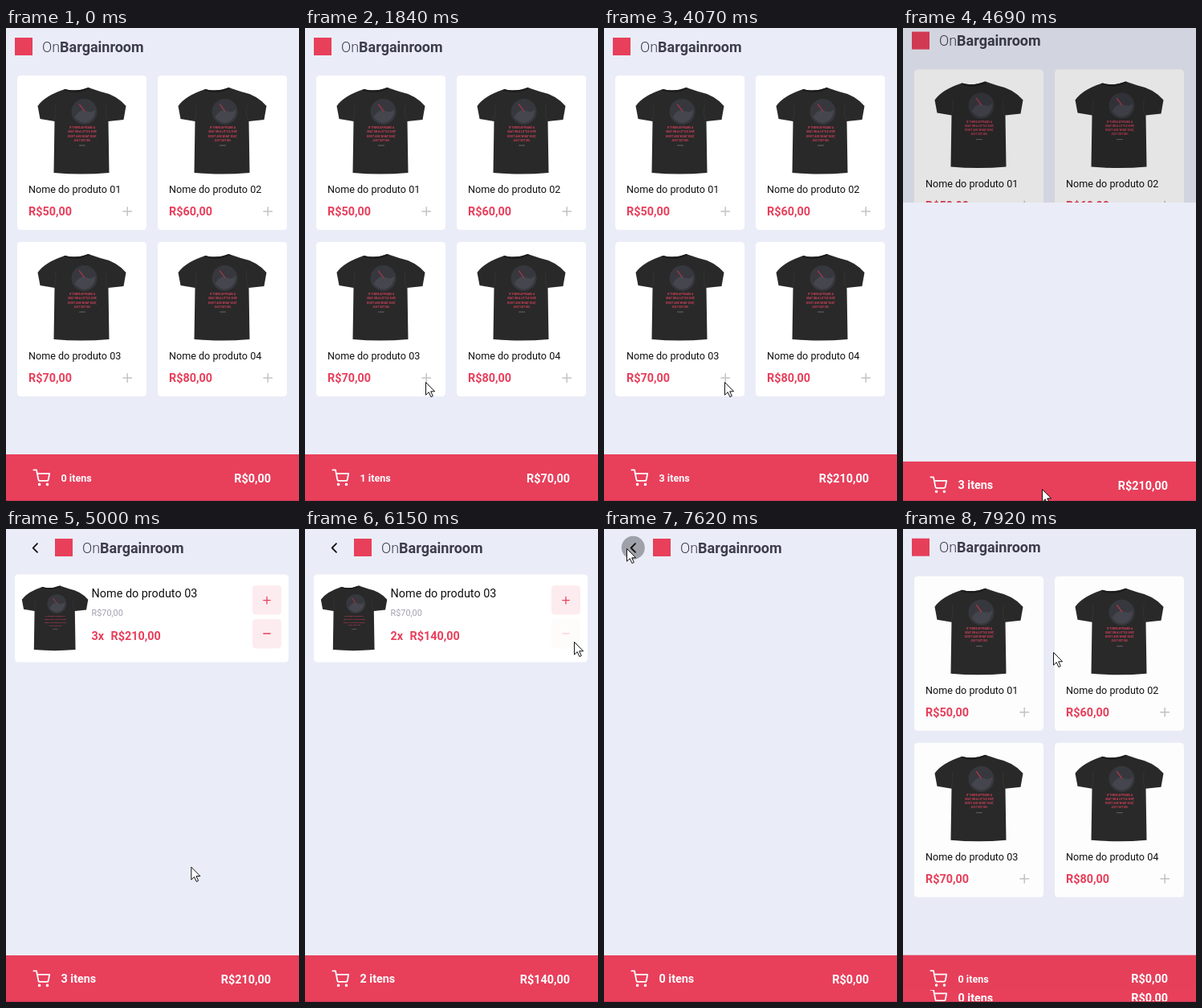
An HTML page that plays this animation: 365x588 px, repeating every 8000 ms.

```html
<!DOCTYPE html>
<html lang="pt">
<head>
<meta charset="utf-8">
<title>Loja</title>
<style>
  html, body { margin: 0; width: 100%; height: 100%; overflow: hidden; background: #eaedf8; }
  svg { display: block; width: 365px; height: 588px; font-family: Roboto, sans-serif; }
  .b { font-weight: 700; }
  .red { fill: #e83f5b; }
  .line { fill: none; stroke-linecap: round; stroke-linejoin: round; }
</style>
</head>
<body>
<svg id="stage" viewBox="0 0 365 588"></svg>
<script>
const RED = '#e83f5b', BG = '#eaedf8', PINK = '#fdecef', W = 365, H = 588, LOOP = 8000;

const text = (x, y, size, body, attrs = '') =>
  `<text x="${x}" y="${y}" font-size="${size}" ${attrs}>${body}</text>`;
const box = (x, y, w, h, fill, r = 0, attrs = '') =>
  `<rect x="${x}" y="${y}" width="${w}" height="${h}" rx="${r}" fill="${fill}" ${attrs}/>`;
const line = (d, color, width, attrs = '') =>
  `<path class="line" d="${d}" stroke="${color}" stroke-width="${width}" ${attrs}/>`;

const heading = x => box(x, 12, 22, 22, RED) +
  text(x + 34, 29.5, 18, '<tspan font-weight="300">On</tspan><tspan class="b">Bargainroom</tspan>', 'fill="#3d3d4d"');

const bar = (id, size) => box(0, 530, W, 90, RED) +
  `<g id="${id}Link">
    <g class="line" transform="translate(33.5 548.5) scale(.9)" stroke="#fff" stroke-width="2">
      <circle cx="9" cy="21" r="1"/><circle cx="20" cy="21" r="1"/>
      <path d="M1 1h4l2.68 13.39a2 2 0 0 0 2 1.61h9.72a2 2 0 0 0 2-1.61L23 6H6"/>
    </g>
    ${text(68.5, 550 + size, size, '', `id="${id}Count" class="b" fill="#fff"`)}
  </g>` +
  text(330, 564.7, 14.4, '', `id="${id}Total" class="b" fill="#fff" text-anchor="end"`);

const quote = ['IF THERE APPEARS A', 'SEAT ON A LITTLE SHIP,', 'DON’T ASK WHAT SEAT,', 'JUST GET ON.'];
const shirt = `<g id="shirt">
  <path fill="#292929" d="M34 3Q48 7 63 1L78 6Q98 10 110 24L107 41 88 43 89 107Q54 110 20 107L21 43 3 40 0 24Q9 11 34 3Z"/>
  <path fill="#1c1c1c" d="M34 3Q48 7 63 1L65 2Q48 11 32 4Z"/>
  ${line('M21 41Q24 31 22 23M87 42Q83 32 86 22', '#343434', 1)}
  <circle cx="58" cy="31" r="16" fill="#37383e"/>
  <path fill="#45464e" d="M46 38Q52 27 60 30T72 28Q71 43 58 45 51 44 46 38Z"/>
  ${line('M52 22L58 30', '#b9374c', 1.2)}
  ${quote.map((q, i) => text(55.5, 52.3 + i * 5.1, 3.3, q, 'class="b" text-anchor="middle" fill="#d0405a"')).join('')}
  ${line('M52 73h7', '#77777c', .8)}
</g>`;

const product = i => {
  const x = 14 + i % 2 * 175, y = 59 + (i >> 1) * 207;
  return box(x, y, 161, 192, '#fff', 4.5) +
    `<use href="#shirt" x="${x + 25.5}" y="${y + 14}"/>` +
    text(x + 14, y + 146.3, 12.6, `Nome do produto 0${i + 1}`, 'fill="#111"') +
    text(x + 14, y + 174, 14.4, `R$${50 + i * 10},00`, 'class="b red"') +
    line(`M${x + 131.9} ${y + 169}h10.6m-5.3 -5.3v10.6`, '#c4c4c4', 1.5, `id="plus${i}"`);
};

stage.innerHTML = `
  <defs>${shirt}<clipPath id="reveal">${box(0, 0, W, H, '#000', 0, 'id="window"')}</clipPath></defs>
  <g id="home">
    ${box(0, 0, W, 620, BG)}${heading(11)}
    ${[0, 1, 2, 3].map(product).join('')}
    ${bar('home', 12.6 + 1.2)}
  </g>
  ${box(0, 0, W, H, '#000', 0, 'id="dim"')}
  <g clip-path="url(#reveal)"><g id="cart">
    ${box(0, 0, W, 620, BG)}
    <circle id="ripple" cx="36.3" cy="23.3" r="14.5"/>
    ${line('M39 18.2l-5.3 5.3 5.3 5.3', '#111', 1.8)}
    ${heading(61)}
    <g id="item">
      ${box(11, 56.5, 341, 109, '#fff', 4.5)}
      <use href="#shirt" transform="translate(19.8 69.8) scale(.75)"/>
      ${text(106.6, 85, 14.4, 'Nome do produto 03', 'fill="#111"')}
      ${text(106.6, 108, 10.8, 'R$70,00', 'fill="#a0a0b2"')}
      ${text(106.6, 138, 14.4, '', 'id="qty" class="b red"')}
      ${text(130.6, 138, 14.4, '', 'id="sum" class="b red"')}
      ${box(307, 70, 36, 36.5, PINK, 4.5)}
      ${line('M320.8 88.7h8.4m-4.2 -4.2v8.4', RED, 1.3)}
      <g id="minus">${box(307, 112, 36, 36.5, PINK, 4.5)}${line('M320.8 130h8.4', RED, 1.3)}</g>
    </g>
    ${bar('cart', 14.4)}
  </g></g>
  ${box(0, 587, W, 1, '#c93a55')}
  <path id="cursor" d="M.5 .5V16.2L4.2 12.7 6.9 18.6 9.3 17.5 6.7 11.8H11.6Z" fill="#fff" stroke="#111"/>`;

const $ = id => document.getElementById(id);
const set = (id, name, value) => $(id).setAttribute(name, value);
$('homeCount').setAttribute('font-size', 12.6);

const clamp = v => Math.max(0, Math.min(1, v));
const ramp = (t, from, to) => clamp((t - from) / (to - from));
const smooth = v => v * v * (3 - 2 * v);

// Screen slide: cubic-bezier(.20833, .82, .25, 1)
function slide(x) {
  const curve = (s, a, b) => 3 * (1 - s) * (1 - s) * s * a + 3 * (1 - s) * s * s * b + s ** 3;
  let lo = 0, hi = 1;
  for (let i = 0; i < 24; i++) {
    const m = (lo + hi) / 2;
    if (curve(m, .20833, .25) < x) lo = m; else hi = m;
  }
  return curve(lo, .82, 1);
}

// Taps: pressed at, released at. The count changes on release.
const adds = [[1530, 1690], [3220, 3390], [3680, 3920]];
const removes = [[5440, 5770], [6060, 6300], [6520, 6680]];
const done = (taps, t) => taps.filter(tap => t >= tap[1]).length;
const fade = (taps, t, recover) => Math.min(...taps.map(([down, up]) =>
  1 - .8 * (ramp(t, down, down + 90) - ramp(t, up, up + recover))));

// Pointer moves: start, end, x, y
const moves = [[840, 1200, 150, 440], [4075, 4390, 173, 573], [4700, 5450, 335, 140],
  [6850, 7460, 28, 24], [7630, 7920, 187, 153]];
const pointer = t => moves.reduce(([x, y], [from, to, mx, my]) => {
  const f = smooth(ramp(t, from, to));
  return [x + (mx - x) * f, y + (my - y) * f];
}, [266, 580]);

function draw(t) {
  const count = done(adds, t) - done(removes, t), total = `R$${count * 70},00`;
  for (const id of ['home', 'cart']) {
    $(id + 'Count').textContent = count + ' itens';
    $(id + 'Total').textContent = total;
  }
  $('qty').textContent = count + 'x';
  $('sum').textContent = total;
  set('item', 'visibility', count ? 'visible' : 'hidden');
  set('plus2', 'opacity', fade(adds, t, 150));
  set('minus', 'opacity', fade(removes, t, 500));
  set('homeLink', 'opacity', fade([[4380, 4530]], t, 150));

  const p = slide(ramp(t, 4611, 5036)) - slide(ramp(t, 7653, 8078));
  set('home', 'transform', `translate(0 ${-.02 * H * p})`);
  set('dim', 'opacity', .1 * clamp(p / .36));
  set('window', 'y', Math.round(H * (1 - p)));
  set('cart', 'transform', `translate(0 ${.041 * H * (1 - p)})`);
  // Whole-pixel clip in stage space keeps the edge free of a seam.
  set('ripple', 'opacity', .32 * ramp(t, 7470, 7600));

  set('cursor', 'transform', `translate(${pointer(t)})`);
  set('cursor', 'visibility', t < 840 ? 'hidden' : 'visible');
}

const start = performance.now();
function tick() {
  draw((performance.now() - start) % LOOP);
  requestAnimationFrame(tick);
}
tick();
</script>
</body>
</html>
```
